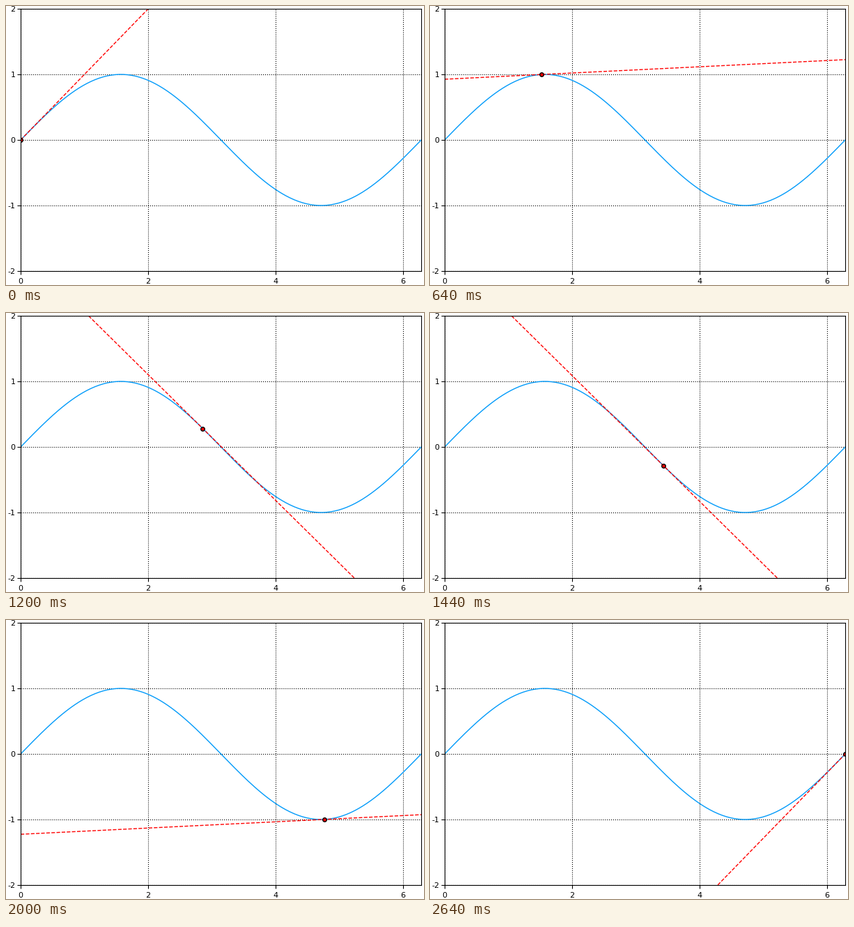
Recreate the animation shown at these times as a matplotlib script. Size 600 by 400 pixels, loop 2.72 s.

```python
import numpy as np
import matplotlib
import matplotlib.pyplot as plt
from matplotlib.animation import FuncAnimation

W, H, DPI = 600, 400, 100
FRAMES, STEP_MS = 34, 80
LEFT, RIGHT, TOP, BOTTOM = 21.06, 596.06, 4.1, 380.0

matplotlib.rcParams["font.family"] = "DejaVu Sans"

fig = plt.figure(figsize=(W / DPI, H / DPI), dpi=DPI, facecolor="white")
ax = fig.add_axes([LEFT / W, 1 - BOTTOM / H, (RIGHT - LEFT) / W, (BOTTOM - TOP) / H])
ax.set_xlim(0, 2 * np.pi)
ax.set_ylim(-2, 2)
ax.set_xticks([0, 2, 4, 6], ["0", "2", "4", "6"])
ax.set_yticks(range(-2, 3), [str(v) for v in range(-2, 3)])
ax.tick_params(labelsize=8, length=3.5, width=0.8, pad=3.5)
ax.tick_params(axis="y", pad=2)
ax.grid(color="black", linestyle=":", linewidth=0.8)
ax.set_axisbelow(True)

x = np.linspace(0, 2 * np.pi, 200)
ax.plot(x, np.sin(x), color="#009afa", linewidth=1)
tangent, = ax.plot([], [], color="red", linestyle="--", linewidth=1)
point, = ax.plot([], [], "o", color="red", markeredgecolor="black",
                 markersize=4, markeredgewidth=1)


def update(i):
    t = 2 * np.pi * i / (FRAMES - 1)
    tangent.set_data(x, np.sin(t) + np.cos(t) * (x - t))
    point.set_data([t], [np.sin(t)])
    return tangent, point


anim = FuncAnimation(fig, update, frames=FRAMES, interval=STEP_MS,
                     repeat=True, repeat_delay=0)
plt.show()
```
